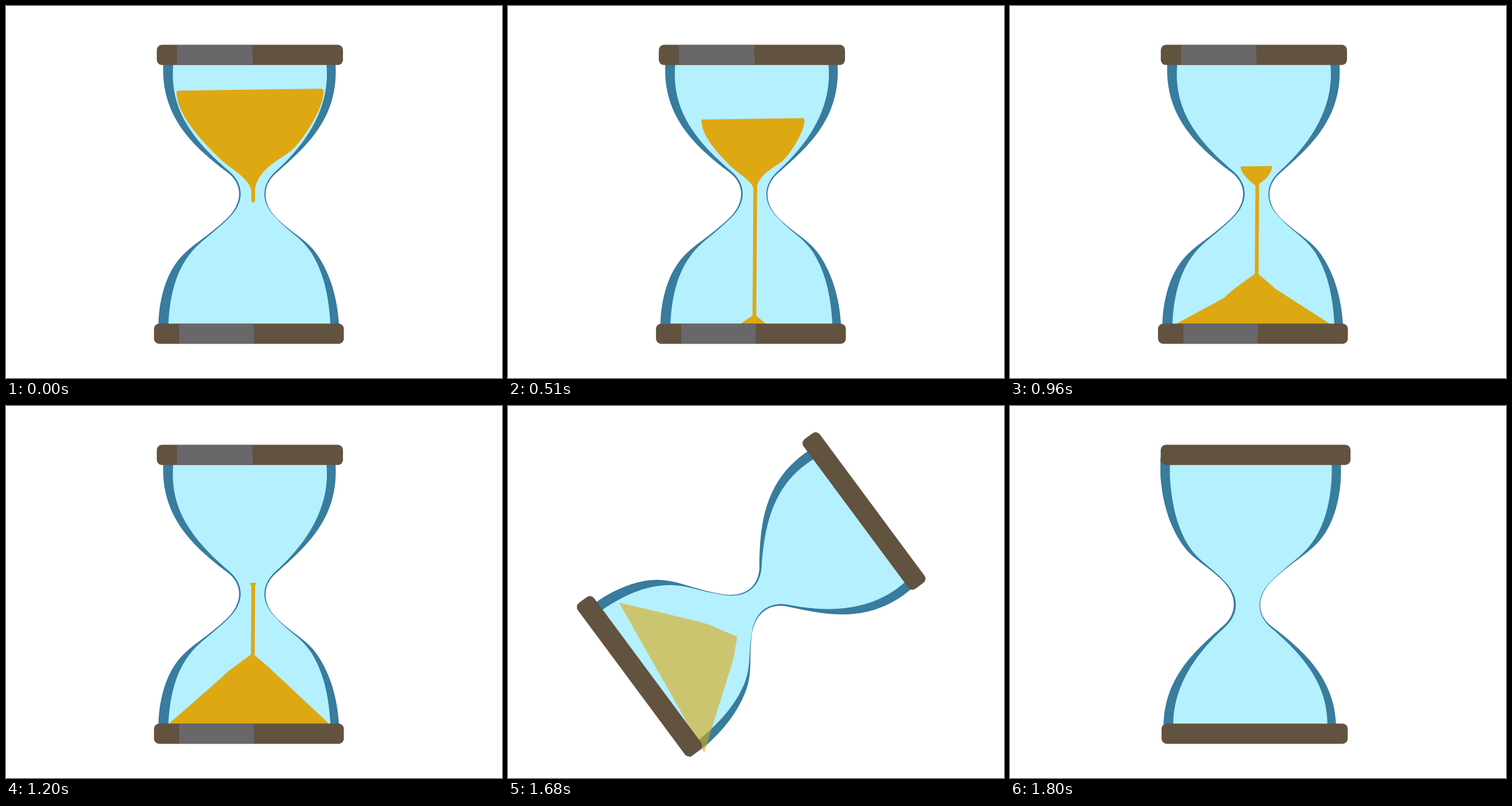
Recreate the animation shown at these times as an HTML page with a canvas. Size 864 px wide and 648 px high, loop 1830 ms.

```html
<!DOCTYPE html>
<html lang="en">
<head>
<meta charset="utf-8">
<title>Hourglass</title>
<style>
html, body { margin: 0; width: 100%; height: 100%; overflow: hidden; background: #fff; }
canvas { display: block; }
</style>
</head>
<body>
<canvas id="stage" width="864" height="648"></canvas>
<script>
const ctx = document.getElementById('stage').getContext('2d');
const LOOP = 1830, STEP = 30, FLIP = 1612.5;
const GOLD = '#dda812', WOOD = '#625240';

const glassRim = new Path2D(`M274 90 V100 C269 194 328 246 386 290 C413 311 413 343 385 370
  C350 403 325 415 305 437 C280 464 267 508 265.5 553 V584 H580 V553
  C577 510 566 468 542 433 C525 408 500 397 474 372 C445 345 445 311 473 289
  C525 243 580 194 574 100 V90 Z`);
const glassFill = new Path2D(`M291.5 92 V100 C284 176 321 230 388 287 C416 311 416 343 387 370.5
  C352 404 340 408 322 430 C294 464 285 510 283 553 V580 H565 V553
  C563 515 556 468 532 430 C515 404 497 397 472 371 C443 344 443 311 471 287
  C526 237 566 174 558 100 V92 Z`);
const topSand = new Path2D(`M299 147.5 L550 144 Q552.5 144 553 148 C555 177 517 234 498 251
  C481 266 437 283 433.5 322 H427.5 C424 300 392 284 375 268
  C341 236 297 188 297 150 Q297 147.5 299 147.5 Z`);
const shine = new Path2D('M298 68 H428.5 L430 102.5 H298 Z M302 553.5 H431.5 V588 H302 Z');
const bars = new Path2D();
bars.roundRect(262.7, 67.6, 324.3, 35.2, 9);
bars.roundRect(257.8, 553.3, 330.7, 35.2, 9);

const clamp = x => Math.min(1, Math.max(0, x));
const ramp = (t, start, length) => clamp((t - start) / length);
const ease = x => (1 - Math.cos(Math.PI * x)) / 2;

function fill(path, color) {
  ctx.fillStyle = color;
  ctx.fill(path);
}

// Runs draw with the context turned by angle about (x, y).
function turned(x, y, angle, draw) {
  ctx.save();
  ctx.translate(x, y);
  ctx.rotate(angle);
  ctx.translate(-x, -y);
  draw();
  ctx.restore();
}

function drawTopSand(t) {
  const size = 1 - ease(ramp(t, 0, 1385));
  if (size <= 0) return;
  ctx.save();
  ctx.translate(430.3, 315.5);
  ctx.scale(size, size);
  ctx.translate(-430.3, -315.5);
  fill(topSand, GOLD);
  ctx.restore();
}

function drawStream(t, apex) {
  const top = 314 + 104 * ramp(t, 1200, 200);
  const tip = Math.min(339 + 0.63 * t, apex + 4);
  if (tip <= top) return;
  const x = y => 430.7 - (y - 320) * 0.007;
  ctx.strokeStyle = GOLD;
  ctx.lineWidth = 6.5;
  ctx.lineCap = 'round';
  ctx.beginPath();
  ctx.moveTo(x(top), top);
  ctx.lineTo(x(tip), tip);
  ctx.stroke();
}

function drawPile(apex) {
  const y = d => Math.min(apex + d, 563);
  ctx.fillStyle = GOLD;
  ctx.beginPath();
  ctx.moveTo(274, 562);
  ctx.lineTo(373, y(44));
  ctx.quadraticCurveTo(384, y(33), 391, y(28));
  ctx.lineTo(425, y(3));
  ctx.quadraticCurveTo(429, y(-2), 433, y(3));
  ctx.lineTo(451, y(18));
  ctx.quadraticCurveTo(456, y(22), 462, y(28));
  ctx.lineTo(575, 565);
  ctx.closePath();
  ctx.fill();
}

function render(t) {
  const angle = Math.PI * ease(ramp(t, FLIP, 184));
  const apex = 563 - 149 * ease(ramp(t, 135, 1366));

  ctx.globalAlpha = 1;
  ctx.fillStyle = '#fff';
  ctx.fillRect(0, 0, 864, 648);

  turned(421, 337, angle, () => fill(glassRim, '#387c9e'));
  turned(421.75, 337, angle, () => fill(glassFill, '#b4f0ff'));

  drawTopSand(t);
  drawStream(t, apex);
  ctx.globalAlpha = 1 - ease(ramp(t, FLIP, 155));
  turned(424.5, 382, angle * 1.12, () => drawPile(apex));

  ctx.globalAlpha = 1;
  turned(425.5, 328, angle, () => fill(bars, WOOD));
  ctx.globalAlpha = 1 - ramp(t, FLIP, 36);
  fill(shine, '#6a676a');
}

const start = performance.now();
function tick() {
  const t = (performance.now() - start) % LOOP;
  render(Math.floor(t / STEP) * STEP);
  requestAnimationFrame(tick);
}
tick();
</script>
</body>
</html>
```
